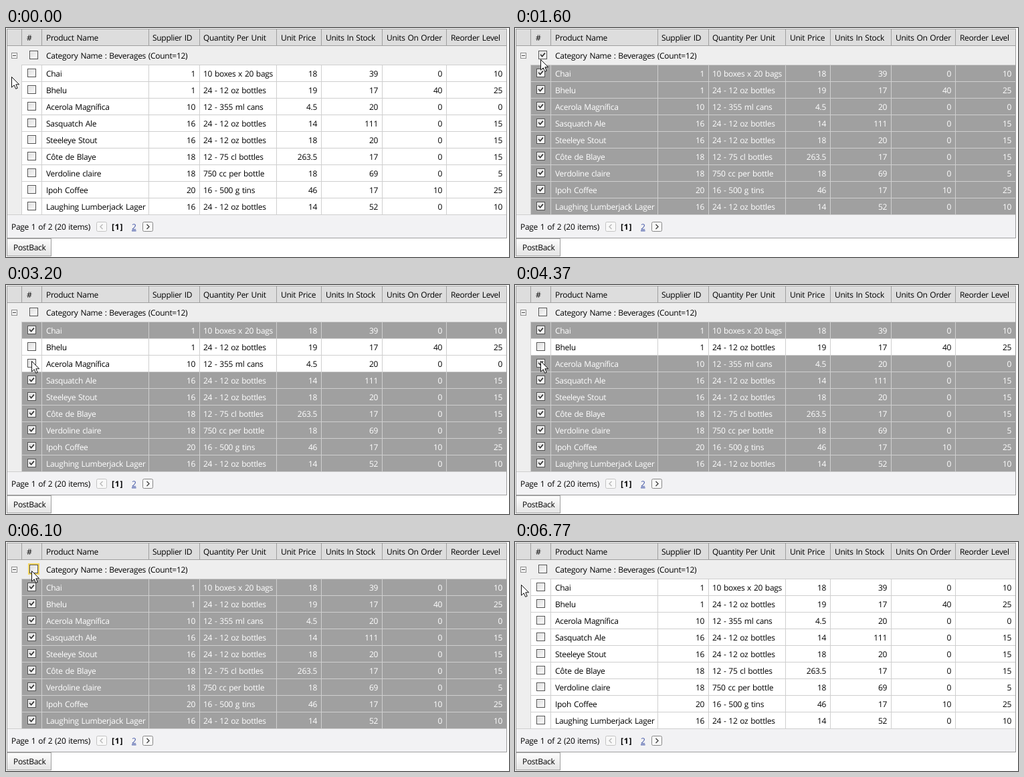
An HTML page for the animation above (8 s loop, 752 by 344 pixels).

```html
<!DOCTYPE html>
<html lang="en">
<head>
<meta charset="utf-8">
<title>Grid selection</title>
<style>
html, body { margin: 0; width: 100%; height: 100%; overflow: hidden; background: #fff; }
svg { display: block; }
text {
  font: 12px "Open Sans", "Noto Sans", sans-serif;
  letter-spacing: -.3px;
  word-spacing: 1px;
  text-rendering: geometricPrecision;
  fill: #000;
  white-space: pre;
}
rect { shape-rendering: crispEdges; }
.row .fill { fill: #fff; }
.row.on .fill { fill: #a0a0a0; }
.row.on text { fill: #fff; }
.tick { fill: none; stroke: #333; stroke-width: 1.7; visibility: hidden; }
.on .tick { visibility: visible; }
.ring { stroke: #f4d660; stroke-width: 2; visibility: hidden; }
</style>
</head>
<body>
<svg id="stage" width="752" height="344" viewBox="0 0 752 344">
  <defs>
    <linearGradient id="button" x2="0" y2="1">
      <stop stop-color="#fdfdfd"/><stop offset="1" stop-color="#e3e3e3"/>
    </linearGradient>
    <linearGradient id="box" x2="1" y2="1">
      <stop stop-color="#dedede"/><stop offset="1" stop-color="#fbfbfb"/>
    </linearGradient>
  </defs>
</svg>
<script>
const LOOP = 8000;
const BORDER = '#9f9f9f', LINE = '#cfcfcf';
const stage = document.getElementById('stage');

function add(parent, tag, attrs, content) {
  const node = document.createElementNS('http://www.w3.org/2000/svg', tag);
  for (const key in attrs) node.setAttribute(key, attrs[key]);
  if (content !== undefined) node.textContent = content;
  return parent.appendChild(node);
}
const rect = (parent, x, y, width, height, fill, extra) =>
  add(parent, 'rect', { x, y, width, height, fill, ...extra });
const label = (parent, x, y, content, extra) => add(parent, 'text', { x, y, ...extra }, content);

function checkbox(parent, x, y) {
  const g = add(parent, 'g', { transform: `translate(${x} ${y})` });
  const ring = rect(g, -1, -1, 15, 15, 'none', { class: 'ring' });
  rect(g, 0, 0, 13, 13, '#505050');
  rect(g, 1, 1, 11, 11, '#f8f8f8');
  rect(g, 2, 2, 9, 9, 'url(#box)');
  add(g, 'path', { class: 'tick', d: 'M3.2 5.7 5.6 8.7 9.9 3.6' });
  return ring;
}

// Column left edge, title, text position, right-aligned values
const columns = [
  [23, '#', 31], [53, 'Product Name', 60], [213, 'Supplier ID', 219, 283],
  [289, 'Quantity Per Unit', 295], [404, 'Unit Price', 411, 465],
  [471, 'Units In Stock', 478, 556], [562, 'Units On Order', 569, 652],
  [658, 'Reorder Level', 665, 742]
];
const products = [
  'Chai|1|10 boxes x 20 bags|18|39|0|10',
  'Bhelu|1|24 - 12 oz bottles|19|17|40|25',
  'Acerola Magnífica|10|12 - 355 ml cans|4.5|20|0|0',
  'Sasquatch Ale|16|24 - 12 oz bottles|14|111|0|15',
  'Steeleye Stout|16|24 - 12 oz bottles|18|20|0|15',
  'Côte de Blaye|18|12 - 75 cl bottles|263.5|17|0|15',
  'Verdoline claire|18|750 cc per bottle|18|69|0|5',
  'Ipoh Coffee|20|16 - 500 g tins|46|17|10|25',
  'Laughing Lumberjack Lager|16|24 - 12 oz bottles|14|52|0|10'
];

// Frame and header
rect(stage, 1, 1, 748, 315, BORDER);
rect(stage, 2, 2, 746, 313, '#eeeeee');
rect(stage, 2, 2, 746, 24, '#dddddd');
rect(stage, 2, 26, 746, 1, BORDER);
for (const [x, title, textX] of columns) {
  rect(stage, x, 2, 1, 24, BORDER);
  label(stage, textX, 19, title);
}

// Group row
const group = add(stage, 'g', {});
rect(group, 23, 55, 725, 1, LINE);
rect(group, 8.5, 37.5, 8, 8, '#f6f6f6', { stroke: '#8c8c8c' });
rect(group, 10, 41, 5, 1, '#444');
label(group, 60, 46, 'Category Name : Beverages (Count=12)');
const groupRing = checkbox(group, 35, 34);

// Data rows
const rows = products.map((product, i) => {
  const y = 56 + 25 * i;
  const node = add(stage, 'g', { class: 'row' });
  rect(node, 24, y, 724, 24, '#fff', { class: 'fill' });
  rect(node, 23, y + 24, 725, 1, LINE);
  for (const [x] of columns) rect(node, x, y, 1, 24, LINE);
  product.split('|').forEach((value, c) => {
    const [, , left, right] = columns[c + 1];
    label(node, right || left, y + 17, value, right ? { 'text-anchor': 'end' } : {});
  });
  return { node, ring: checkbox(node, 32, y + 5) };
});

// Pager
rect(stage, 2, 280, 746, 1, LINE);
rect(stage, 2, 281, 746, 34, '#f2f2f4');
label(stage, 8, 303, 'Page 1 of 2 (20 items)');
label(stage, 158, 303, '[1]', { style: 'font-weight:700;letter-spacing:.8px' });
label(stage, 188, 303, '2', { style: 'fill:#394ea2;text-decoration:underline' });
function pageButton(x, border, arrow, d) {
  add(stage, 'rect', {
    x: x + .5, y: 291.5, width: 15, height: 14, rx: 2, fill: '#f8f8f8',
    stroke: border, style: 'shape-rendering:auto'
  });
  add(stage, 'path', { d, transform: `translate(${x} 290.5)`, fill: 'none', stroke: arrow, 'stroke-width': 1.4 });
}
pageButton(135, '#c4c4c4', '#b8b8b8', 'M9.5 4.5 6 8 9.5 11.5');
pageButton(204, '#888', '#444', 'M6.5 4.5 10 8 6.5 11.5');

// Button
rect(stage, 1.5, 316.5, 66, 26, 'url(#button)', { stroke: BORDER });
label(stage, 11, 334, 'PostBack');

const cursor = add(stage, 'path', {
  d: 'M.5 .5V16.2L4.2 12.8 6.7 18.4 9.2 17.3 6.8 11.8H11.6Z',
  fill: '#fff', stroke: '#111', 'stroke-width': 1
});

// start, end, steps, x, y
const moves = [
  [0, 0, 1, 8, 73],
  [500, 940, 13, 38, 45],
  [1500, 2040, 14, 37, 90],
  [2370, 2700, 10, 38, 114],
  [4400, 4640, 6, 38, 94],
  [5170, 5540, 11, 38, 43],
  [6280, 6770, 12, 9, 64]
];
const ease = p => p * p * (3 - 2 * p);

function cursorAt(t) {
  let [, , , x, y] = moves[0];
  for (const [start, end, steps, toX, toY] of moves.slice(1)) {
    if (t < start) break;
    const p = ease(Math.min(1, Math.floor((t - start) / (end - start) * steps + 1e-6) / steps));
    x += (toX - x) * p;
    y += (toY - y) * p;
  }
  return [Math.round(x), Math.round(y)];
}

const within = (t, a, b) => t >= a && t < b;
const showRing = (ring, visible) => { ring.style.visibility = visible ? 'visible' : 'hidden'; };

function draw(t) {
  group.classList.toggle('on', within(t, 1370, 2340) || within(t, 5170, 6100));
  rows.forEach(({ node }, i) => {
    const cleared = i === 1 && within(t, 2270, 5100) || i === 2 && within(t, 3070, 4370);
    node.classList.toggle('on', within(t, 1470, 6240) && !cleared);
  });
  showRing(groupRing, within(t, 1370, 1470) || within(t, 6100, 6240));
  showRing(rows[1].ring, within(t, 2270, 2340));
  showRing(rows[2].ring, within(t, 3070, 3200));
  cursor.setAttribute('transform', `translate(${cursorAt(t)})`);
}

const began = performance.now();
function tick() {
  draw((performance.now() - began) % LOOP);
  requestAnimationFrame(tick);
}
tick();
</script>
</body>
</html>
```
